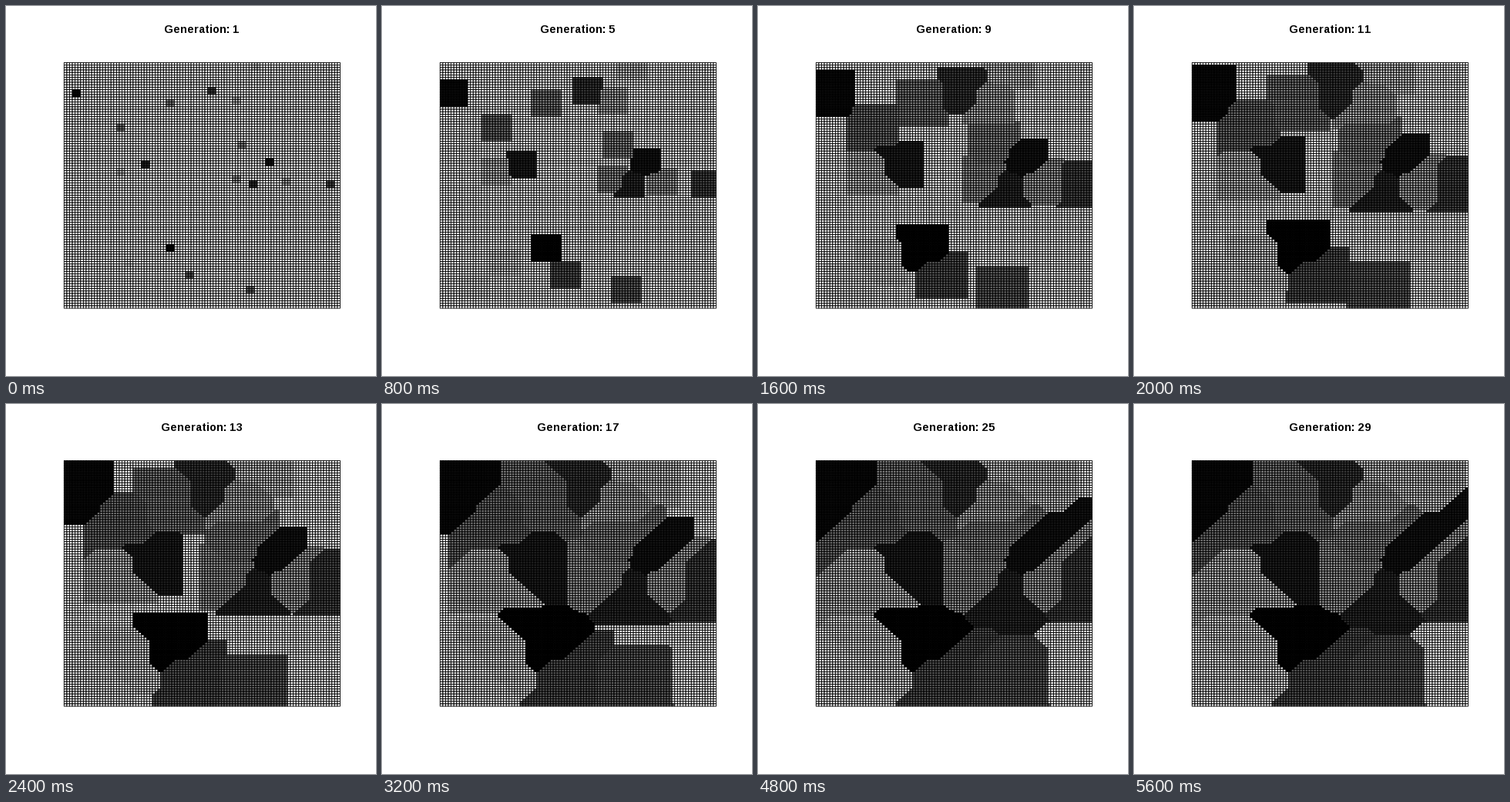
These frames come from a looping animation (480 px wide and 480 px high, 5.8 s). A matplotlib script:

```python
import numpy as np
import matplotlib.pyplot as plt
from matplotlib.animation import FuncAnimation

SIZE, N, GENS, STEP = 480, 100, 29, 200
LEFT, RIGHT, TOP, BOTTOM = 75.3, 433.5, 73.5, 392.1
EMPTY = -1

# (column, row) of each nucleus, from darkest to lightest
NUCLEI = [
    (38, 75), (4, 12), (74, 40), (29, 41), (68, 49), (53, 11), (96, 49),
    (45, 86), (67, 92), (20, 26), (38, 16), (64, 33), (62, 47), (80, 48),
    (62, 15), (20, 44), (69, 1), (23, 81), (12, 90), (99, 82),
]


def grow(grid):
    """Empty cells copy the first occupied neighbour, left to right."""
    pad = np.pad(grid, 1, constant_values=EMPTY)
    out = grid.copy()
    for dx in (-1, 0, 1):
        for dy in (-1, 0, 1):
            near = pad[1 + dy:1 + dy + N, 1 + dx:1 + dx + N]
            out = np.where(out == EMPTY, near, out)
    return out


def generations():
    grid = np.full((N, N), EMPTY)
    for rank, (x, y) in enumerate(NUCLEI):
        grid[y, x] = rank
    for _ in range(GENS):
        grid = grow(grid)
        yield grid


def shade(grid):
    """Gray rises smoothly with rank; empty cells are white."""
    ramp = np.clip(grid / (len(NUCLEI) - 1), 0, 1) ** 1.15
    return np.where(grid == EMPTY, 1, ramp)


grids = [shade(g) for g in generations()]

plt.rcParams["text.hinting_factor"] = 1
fig = plt.figure(figsize=(SIZE / 72, SIZE / 72), dpi=72, facecolor="white")
ax = fig.add_axes([0, 0, 1, 1])
ax.set(xlim=(0, SIZE), ylim=(SIZE, 0))
ax.axis("off")

mesh = ax.pcolormesh(
    np.linspace(LEFT, RIGHT, N + 1), np.linspace(TOP, BOTTOM, N + 1), grids[0],
    cmap="gray", vmin=0, vmax=1, edgecolors="black", linewidth=0.85,
    antialiased=True, snap=False)
title = ax.text(254.4, 35, "", ha="center", va="baseline", fontsize=14.4,
                family="Liberation Sans", weight="bold")


def draw(i):
    mesh.set_array(grids[i])
    title.set_text(f"Generation: {i + 1}")
    return mesh, title


anim = FuncAnimation(fig, draw, frames=GENS, interval=STEP, repeat=True,
                     repeat_delay=0)
plt.show()
```
